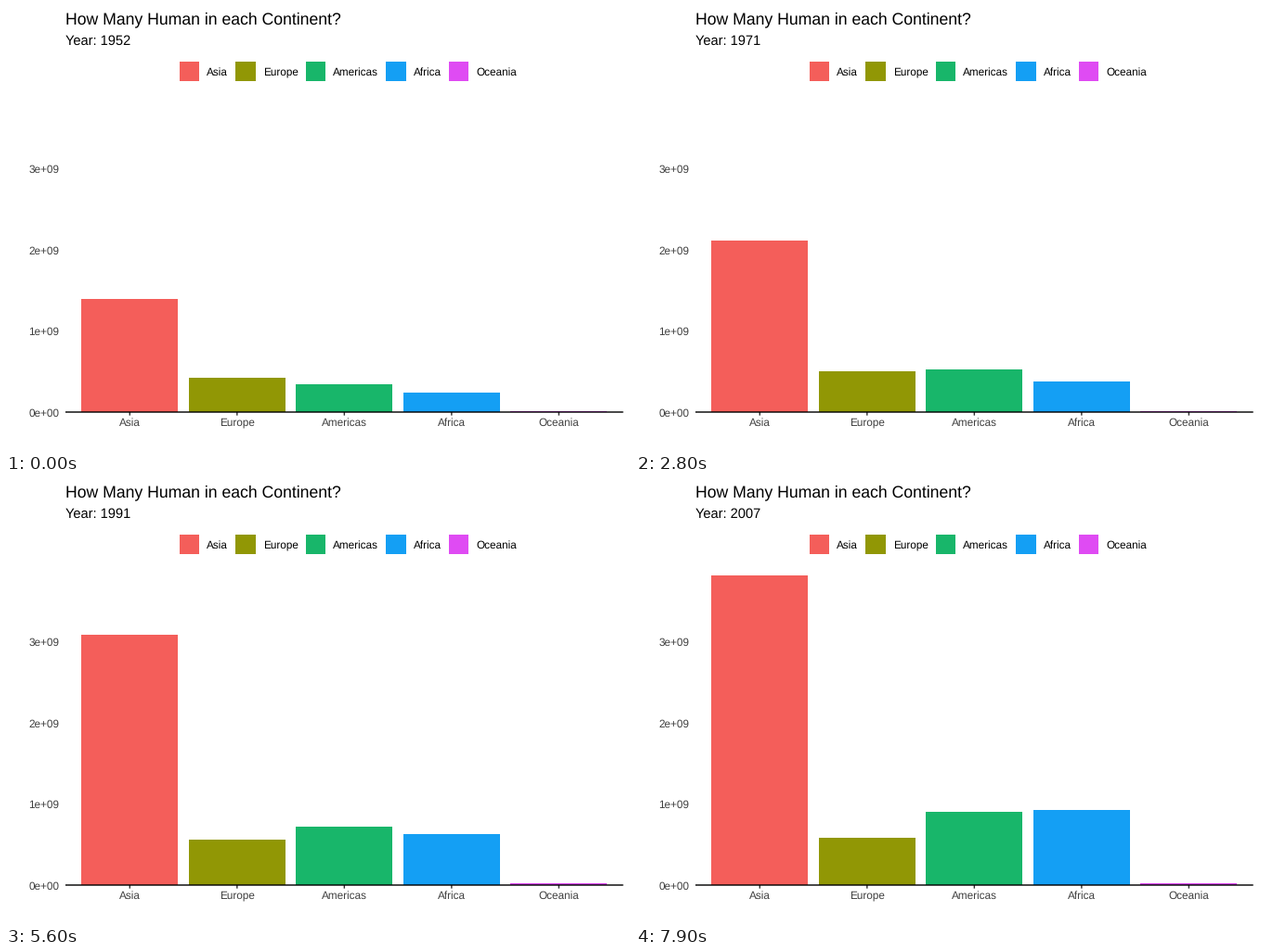
A matplotlib script for the animation above (10000 ms loop, 672 px wide and 480 px high).

```python
import numpy as np
import matplotlib.pyplot as plt
from matplotlib.animation import FuncAnimation
from matplotlib.patches import Rectangle

plt.rcParams["font.family"] = "Liberation Sans"
plt.rcParams["text.hinting"] = "none"

WIDTH, HEIGHT, DPI = 672, 480, 100
FRAMES, MOVING, INTERVAL = 100, 80, 100
PT = 72 / DPI  # points per pixel

LEFT, RIGHT, BASE = 64, 664.7, 438
PX_PER_BILLION = 87.58
STEP = (RIGHT - LEFT) / 5.2
TITLE, SUBTITLE, LABEL = 17.6, 14.67, 11.73
STROKE, KEY_SIZE = 1.42, 21.6

# Name, colour, legend key position, and growth polynomial:
# population in millions over t = 0 (1952) to 1 (2007), highest power first
CONTINENTS = [
    ("Asia", "#f45e5a", 186.6, (-1363, 2470, 1310, 1395.4)),
    ("Europe", "#919705", 247.1, (-87.3, 255.3, 418.1)),
    ("Americas", "#18b66a", 322.6, (68.2, 485.5, 345.2)),
    ("Africa", "#149ff4", 409.2, (466.7, 225.2, 237.6)),
    ("Oceania", "#df4bf3", 476.8, (-0.7, 14.5, 10.7)),
]

fig = plt.figure(figsize=(WIDTH / DPI, HEIGHT / DPI), dpi=DPI, facecolor="white")
ax = fig.add_axes([0, 0, 1, 1])
ax.set_xlim(0, WIDTH)
ax.set_ylim(HEIGHT, 0)
ax.axis("off")


def box(x0, x1, y0, y1, color):
    x0, x1 = round(x0), round(x1)
    return ax.add_patch(Rectangle((x0, y0), x1 - x0, y1 - y0, facecolor=color,
                                  linewidth=0, antialiased=False))


def label(x, baseline, text, size, color="black", ha="left"):
    return ax.text(x, baseline, text, fontsize=size * PT, color=color,
                   ha=ha, va="baseline")


def line(xs, ys, color, z):
    ax.plot(xs, ys, color=color, linewidth=STROKE * PT, zorder=z,
            solid_capstyle="butt", snap=False)


label(LEFT, 19, "How Many Human in each Continent?", TITLE)
year_text = label(LEFT, 42, "", SUBTITLE)

bars = []
for i, (name, color, key_x, _) in enumerate(CONTINENTS):
    box(key_x, key_x + KEY_SIZE, 60, 81, color)
    label(key_x + 29.8, 75, name, LABEL)
    center = LEFT + (0.6 + i) * STEP
    bars.append(box(center - 0.45 * STEP, center + 0.45 * STEP,
                    BASE - 1, BASE, color))
    line([center, center], [BASE, BASE + 3.67], "#333333", 3)
    label(center, 453, name, LABEL, "#404040", "center")

for n in range(4):
    label(57.4, BASE - n * PX_PER_BILLION + 4.6, f"{n}e+09" if n else "0e+00",
          LABEL, "#404040", "right")
line([LEFT, RIGHT], [BASE, BASE], "black", 4)


def update(frame):
    t = min(frame / (MOVING - 1), 1)
    year_text.set_text(f"Year: {round(1952 + 55 * t)}")
    for bar, (*_, growth) in zip(bars, CONTINENTS):
        millions = np.polyval(growth, t)
        top = round(BASE - millions / 1000 * PX_PER_BILLION)
        bar.set_y(top)
        bar.set_height(BASE - top)
    return [year_text, *bars]


anim = FuncAnimation(fig, update, frames=FRAMES, interval=INTERVAL,
                     repeat=True, repeat_delay=0, blit=False)
plt.show()
```
